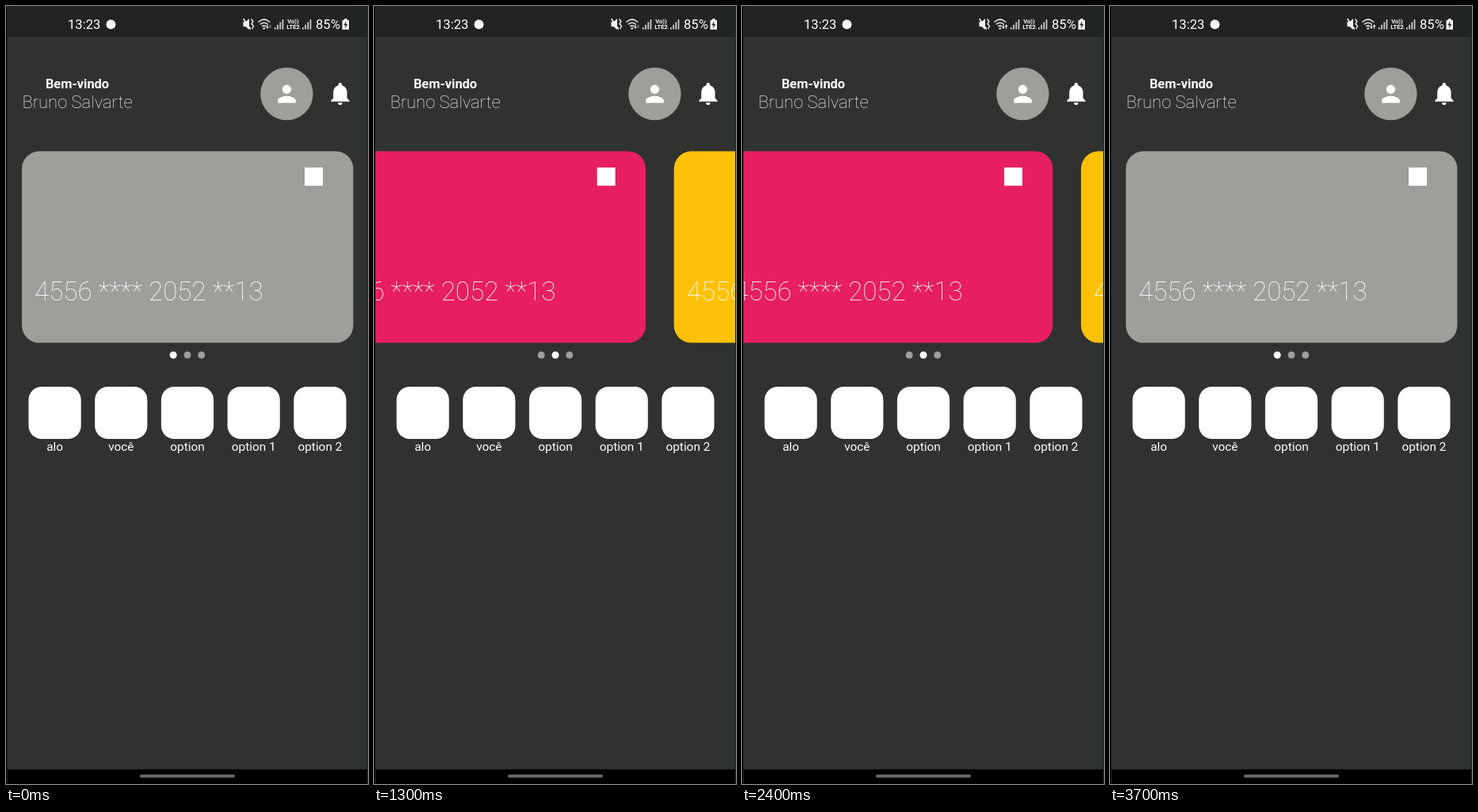
Write an HTML page that moves like this. It is 457 px wide and 983 px high and loops after 4.3 s.

```html
<!DOCTYPE html>
<html lang="pt">
<head>
<meta charset="utf-8">
<title>Carteira</title>
<style>
  html, body { margin: 0; width: 100%; height: 100%; overflow: hidden; background: #000; }
  svg { display: block; width: 100vw; height: 100vh; }
  text { font-family: Roboto, "Open Sans", sans-serif; fill: #fff; white-space: pre; }
  .mid { text-anchor: middle; }
  .thin { font-weight: 100; }
  .line { fill: none; stroke: #f4f5f3; stroke-width: 1.4; }
</style>
</head>
<body>
<svg id="stage" viewBox="0 0 457 983">
  <defs><clipPath id="screen"><rect x="2" width="454" height="983"/></clipPath></defs>
  <rect width="457" height="983" fill="#000"/>
  <rect x="1" width="455" height="38.5" fill="#222421"/>
  <rect x="1" y="38.5" width="455" height="926" fill="#30322f"/>
  <path d="M1 0h1v983h-1zM456 0h1v983h-1z" fill="#102a31"/>
  <rect y="977" width="2" height="1" fill="#b00020"/>
  <rect x="169" y="971" width="120" height="4" rx="2" fill="#646464"/>

  <g id="status" fill="#f4f5f3">
    <text x="78" y="29" font-size="16.6">13:23</text>
    <circle cx="132.5" cy="23.3" r="6"/>
    <path d="M299.5 20h3l4.5-4v14l-4.500-4h-3z"/>
    <path class="line" d="M299.500 16l9.500 13.500M309.500 16.500l2.500 3-2 3 2.500 3-2 3.500"/>
    <path class="line" d="M318.500 20.500q7.300-7.200 14.600 0M321 23.200q4.800-4.600 9.600 0M323.300 25.800q2.500-2.200 5 0"/>
    <circle cx="325.700" cy="28.200" r="1.300"/>
    <path d="M328.200 26h3.600l-1.800 3.200zM329.500 23.500h1v3h-1z"/>
    <path id="up" d="M331.800 26.200h3.600l-1.800-3.200zM333.100 26h1v3h-1z"/>
    <text x="362.500" y="21.800" class="mid" font-size="7.600" font-weight="700">Vo))</text>
    <text x="362.500" y="29.300" class="mid" font-size="7.600" font-weight="700">LTE2</text>
    <text x="391" y="29" font-size="16.600">85%</text>
    <path d="M427 16h3.500v1.800h2.500v12h-8.500v-12h2.500z"/>
    <path d="M429.500 19l-3.200 5.300h2.200l-.6 4.200 3.300-5.500h-2.200z" fill="#222421"/>
  </g>

  <text x="90" y="103.800" class="mid" font-size="16.400" font-weight="700">Bem-vindo</text>
  <text x="90" y="129" class="mid thin" font-size="22">Bruno Salvarte</text>
  <circle cx="354.400" cy="111" r="33.200" fill="#9d9f9b"/>
  <path transform="translate(337.300 93.800) scale(1.430)" fill="#fff"
    d="M12 12a4 4 0 1 0 0-8 4 4 0 0 0 0 8zm0 2c-2.670 0-8 1.340-8 4v2h16v-2c0-2.660-5.330-4-8-4z"/>
  <path transform="translate(404.600 93.400) scale(1.440)" fill="#fff"
    d="M12 22c1.100 0 2-.9 2-2h-4c0 1.100.9 2 2 2zm6-6v-5c0-3.070-1.640-5.640-4.500-6.320V4a1.500 1.500 0 0 0-3 0v.68C7.630 5.360 6 7.920 6 11v5l-2 2v1h16v-1z"/>

  <g clip-path="url(#screen)"><g id="cards"></g></g>
  <g id="dots"></g>
  <g id="options"></g>
</svg>
<script>
const LOOP = 4300, STEP = 100, PITCH = 454, DRAG = 300, DECAY = 0.0094;
const GREY = '#9d9f9b';

// Each swipe drags for DRAG ms up to `release`, then settles on `to`.
const swipes = [
  { start: 300, from: 0, release: 296, to: PITCH },
  { start: 1100, from: PITCH - 1, release: 630, to: 2 * PITCH },
  { start: 2100, from: 2 * PITCH, release: 500, to: 500 },
  { start: 2700, from: 500, release: 189, to: 0 }
];

const $ = id => document.getElementById(id);

function add(parent, tag, attrs, text) {
  const el = document.createElementNS('http://www.w3.org/2000/svg', tag);
  for (const k in attrs) el.setAttribute(k, attrs[k]);
  if (text) el.textContent = text;
  return parent.appendChild(el);
}

function addSignal(x) {
  for (let i = 0; i < 4; i++) {
    const h = 2.5 + i * 3.3;
    add($('status'), 'rect', { x: x + i * 3.2, y: 29.5 - h, width: 1.7, height: h, opacity: 0.85 });
  }
}
addSignal(339);
addSignal(374);

[GREY, '#e71f60', '#ffc107'].forEach((fill, i) => {
  const card = add($('cards'), 'g', { transform: `translate(${20 + i * PITCH} 183.6)` });
  add(card, 'rect', { width: 418.4, height: 242, rx: 22, fill });
  add(card, 'rect', { x: 357, y: 20.5, width: 23, height: 23, fill: '#fff' });
  add(card, 'text', { x: 16, y: 188.5, 'font-size': 33.2, class: 'thin' }, '4556 **** 2052 **13');
});

const dots = [211.2, 229, 246.8].map(cx => add($('dots'), 'circle', { cx, cy: 441, r: 4.5 }));

['alo', 'você', 'option', 'option 1', 'option 2'].forEach((label, i) => {
  const x = 28.5 + i * 83.7;
  add($('options'), 'rect', { x, y: 481, width: 66.2, height: 66, rx: 16.5, fill: '#fff' });
  add($('options'), 'text', { x: x + 33.1, y: 561.6, 'font-size': 15.4, class: 'mid' }, label);
});

function scrollAt(t) {
  const s = swipes.filter(w => t >= w.start).pop();
  if (!s) return 0;
  const dt = t - s.start;
  if (dt < DRAG) return s.from + (s.release - s.from) * (dt / DRAG) ** 1.5;
  const rest = (s.release - s.to) * Math.exp(-DECAY * (dt - DRAG));
  return s.to + (Math.abs(rest) < 0.3 ? 0 : rest);
}

function draw(time) {
  const t = Math.floor((time % LOOP) / STEP) * STEP;
  const x = scrollAt(t);
  const page = Math.round(x / PITCH);
  $('cards').setAttribute('transform', `translate(${-x} 0)`);
  dots.forEach((d, i) => d.setAttribute('fill', i === page ? '#fff' : GREY));
  $('up').setAttribute('opacity', t < 2400 ? 0.4 : 1);
}

const begin = performance.now();
function tick() {
  draw(performance.now() - begin);
  requestAnimationFrame(tick);
}
tick();
</script>
</body>
</html>
```
